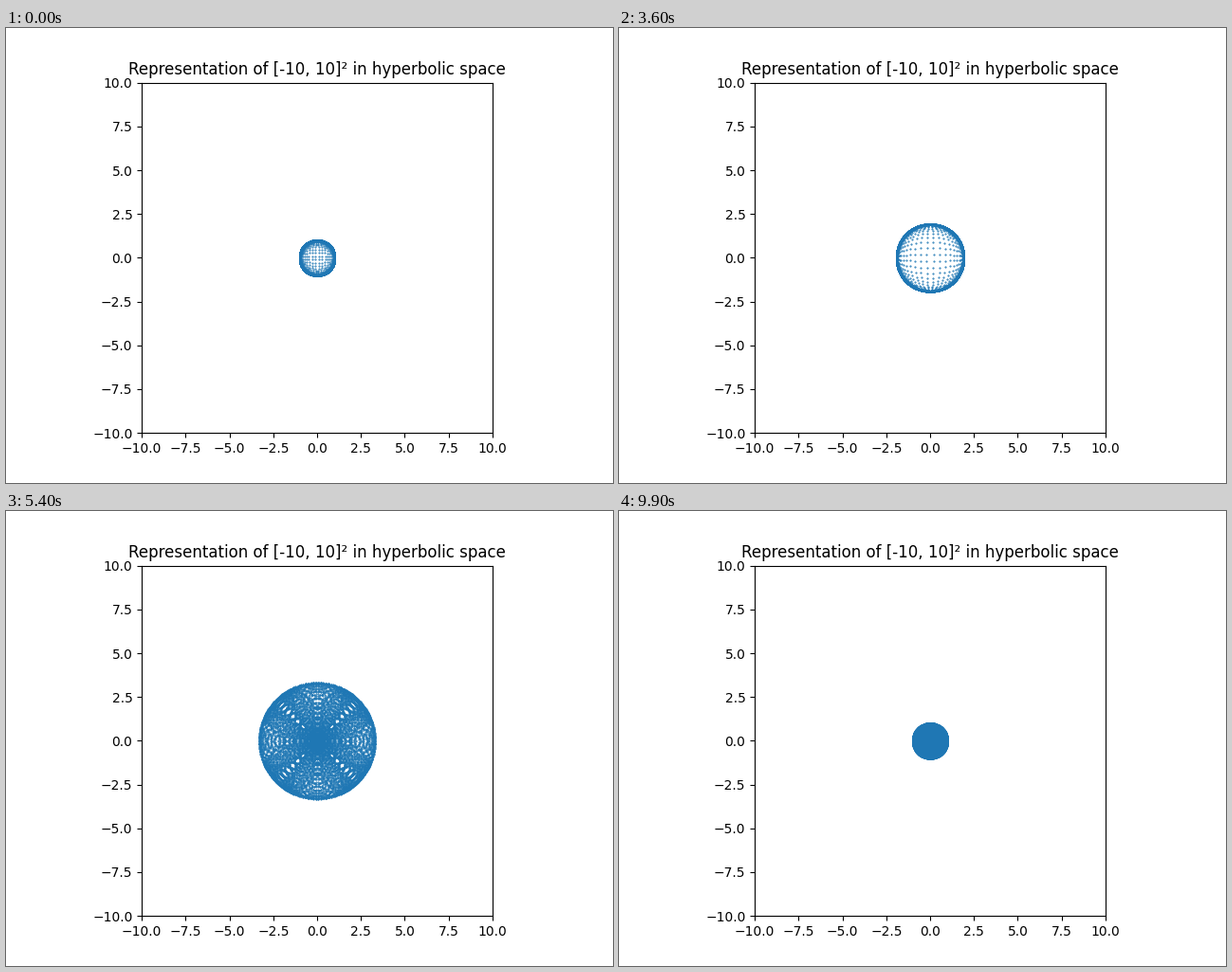
These frames come from a looping animation (640 px wide and 480 px high, 10000 ms). A matplotlib script:

```python
import numpy as np
import matplotlib.pyplot as plt
from matplotlib.animation import FuncAnimation

FRAMES = 100
LIMIT = 10

side = np.linspace(-LIMIT, LIMIT, 100)
x, y = (g.ravel() for g in np.meshgrid(side, side))
r = np.hypot(x, y)
curvatures = np.linspace(-1, 1, FRAMES)


def project(k):
    """Map the plane grid into the disc of radius 1/sqrt(|k|)."""
    bend = np.tanh if k < 0 else np.sin
    scale = bend(r) / (r * np.sqrt(abs(k)))
    return x * scale, y * scale


fig, ax = plt.subplots(figsize=(6.4, 4.8), dpi=100)
ax.set_aspect("equal")
ax.set_xlim(-LIMIT, LIMIT)
ax.set_ylim(-LIMIT, LIMIT)
ax.set_title("Representation of [-10, 10]² in hyperbolic space")
dots, = ax.plot([], [], ".", color="tab:blue", markersize=1)


def update(i):
    dots.set_data(*project(curvatures[i]))
    return dots,


anim = FuncAnimation(fig, update, frames=FRAMES, interval=100,
                     repeat=True, repeat_delay=0)
plt.show()
```
